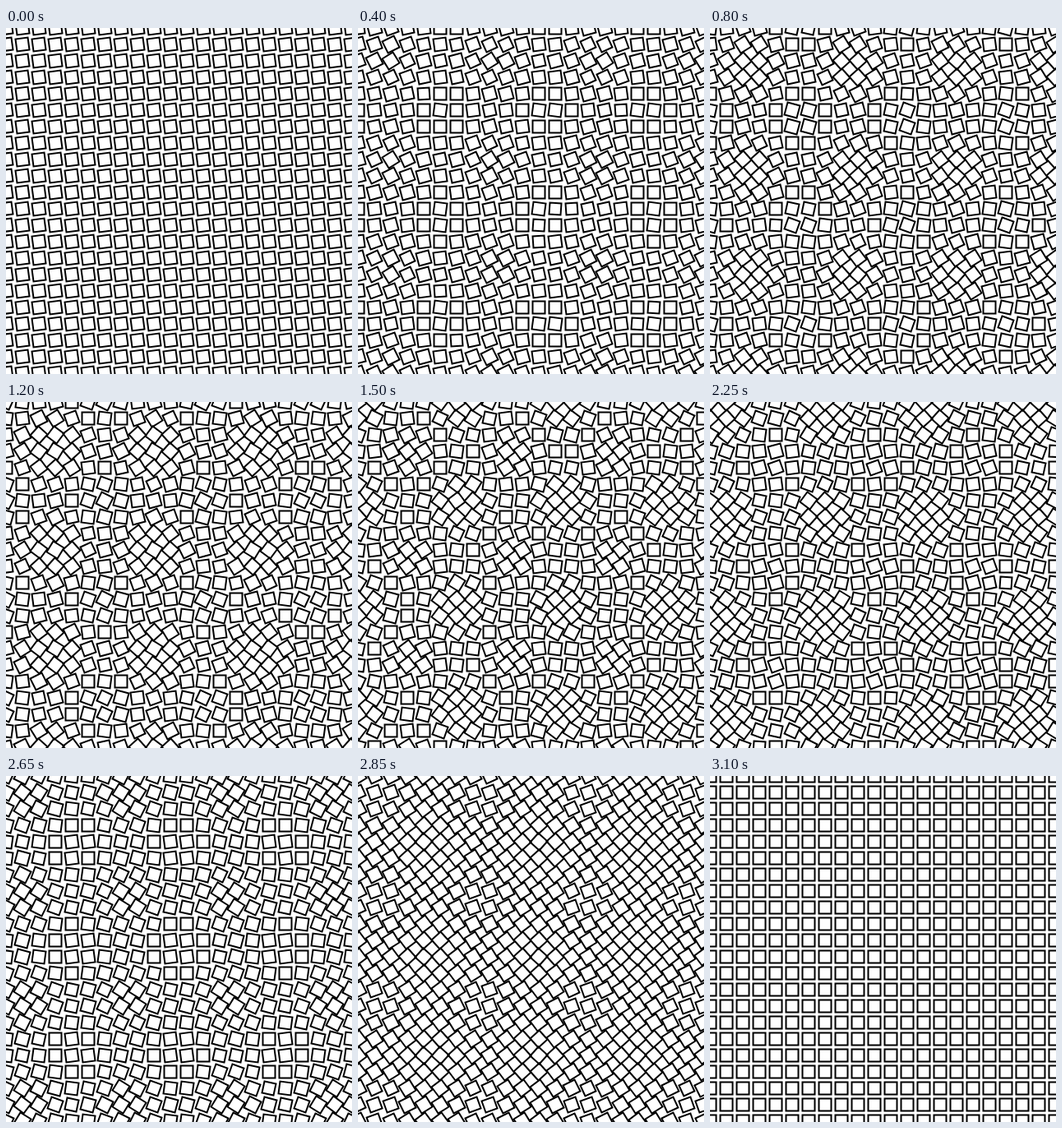
Recreate the animation shown at these times as an HTML page with a canvas. Size 421 by 421 pixels, loop 3150 ms.

```html
<!DOCTYPE html>
<html lang="en">
<head>
<meta charset="utf-8">
<title>Turning squares</title>
<style>
  html, body { margin: 0; width: 100%; height: 100%; overflow: hidden; background: #fff; }
  canvas { display: block; }
</style>
</head>
<body>
<canvas id="stage" width="421" height="421"></canvas>
<script>
  const ctx = document.getElementById('stage').getContext('2d');
  const SIZE = 421, PITCH = 20, SIDE = 15, COUNT = 22;
  const STEP = 50, STEPS = 63;
  const TILT = Math.PI / 18, SPIN = 2, SWAY = 0.2;

  // Each square spins evenly, plus a swing whose phase travels along the grid.
  const swing = (n, t) => Math.cos(n - t) - Math.cos(n);

  // Corners sit on pixel centres.
  const snap = v => Math.floor(v) + 0.5;

  function square(x, y, angle) {
    const radius = SIDE / Math.SQRT2;
    for (let corner = 0; corner < 4; corner++) {
      const a = Math.PI / 4 + corner * Math.PI / 2 - angle;
      ctx.lineTo(snap(x + radius * Math.cos(a)), snap(y + radius * Math.sin(a)));
    }
    ctx.closePath();
  }

  function draw(step) {
    const t = step / 10;
    ctx.fillStyle = '#fff';
    ctx.fillRect(0, 0, SIZE, SIZE);
    ctx.strokeStyle = '#000';
    ctx.lineWidth = 2;
    for (let row = 0; row < COUNT; row++) {
      for (let col = 0; col < COUNT; col++) {
        const angle = TILT + SPIN * t + SWAY * (swing(col, t) + swing(row, t));
        ctx.beginPath();
        square(col * PITCH, row * PITCH, angle);
        ctx.stroke();
      }
    }
  }

  const start = performance.now();
  let shown = -1;

  function tick() {
    const step = Math.floor((performance.now() - start) / STEP) % STEPS;
    if (step !== shown) draw(shown = step);
    requestAnimationFrame(tick);
  }
  tick();
</script>
</body>
</html>
```
